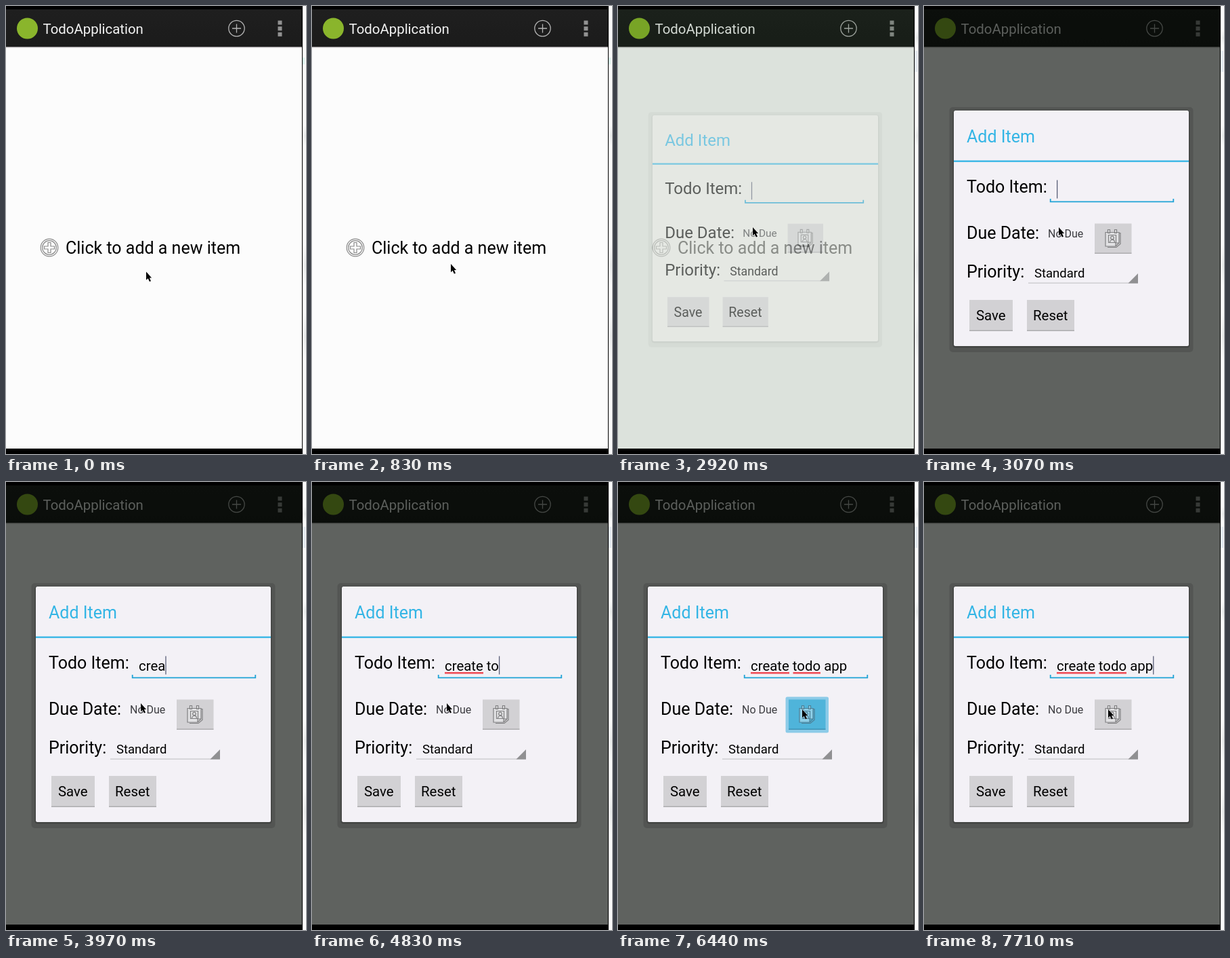
Recreate the animation shown at these times as an HTML page. Size 443 px wide and 660 px high, loop 8000 ms.

```html
<!DOCTYPE html>
<html lang="en">
<head>
<meta charset="utf-8">
<title>Todo list</title>
<style>
  html, body { margin: 0; width: 100%; height: 100%; overflow: hidden; background: #fff; }
  svg { display: block; width: 443px; height: 660px; }
  text { font-family: Roboto, "Open Sans", sans-serif; white-space: pre; }
  .label { font-size: 25px; }
  .small { font-size: 20.4px; }
  .line { fill: none; stroke: #8a8a8a; stroke-width: 1.2; }
</style>
</head>
<body>
<svg viewBox="0 0 443 660">
  <defs>
    <linearGradient id="bar" x2="0" y2="1">
      <stop stop-color="#1f1f1f"/><stop offset="1" stop-color="#1b1b1b"/>
    </linearGradient>
    <linearGradient id="drop" x2="0" y2="1">
      <stop stop-color="#8c868a"/><stop offset="1" stop-color="#fcfcfc"/>
    </linearGradient>
    <linearGradient id="smudge" x2="0" y2="1">
      <stop stop-color="#eceeee" stop-opacity="0"/><stop offset=".5" stop-color="#eceeee"/>
      <stop offset="1" stop-color="#eceeee" stop-opacity="0"/>
    </linearGradient>
  </defs>

  <!-- window behind, right edge -->
  <rect x="437" width="6" height="660" fill="#fdfdfd"/>
  <rect x="438" y="176" width="5" height="30" fill="url(#smudge)"/>
  <rect x="438" y="352" width="5" height="60" fill="url(#smudge)"/>
  <rect x="438" y="452" width="5" height="68" fill="url(#smudge)"/>
  <rect id="edgeA" x="438" y="76" width="3" height="10" fill="#d9f3ea"/>
  <g id="edgeB">
    <rect x="438" y="36" width="5" height="22" fill="url(#smudge)"/>
    <rect x="438" y="66" width="4" height="31" fill="#e3e9f1"/>
  </g>

  <!-- app screen -->
  <rect width="438" height="660"/>
  <rect y="60" width="437" height="592" fill="#fcfcfc"/>
  <rect y="5" width="437" height="55" fill="url(#bar)"/>
  <rect y="60" width="437" height="2" fill="url(#drop)"/>
  <circle cx="31.5" cy="33" r="15.5" fill="#8ab52c"/>
  <text class="small" x="54.5" y="41" fill="#f3f3f3">TodoApplication</text>
  <path d="M328.8 33a11.7 11.7 0 1 0 23.4 0a11.7 11.7 0 1 0-23.4 0M334 33h13M340.5 26.5v13"
        fill="none" stroke="#b4b4b4" stroke-width="1.3"/>
  <path d="M401.5 21.5h6v6h-6zM401.5 30.2h6v6h-6zM401.5 38.8h6v6h-6z" fill="#929292"/>
  <circle class="line" cx="64" cy="356" r="12.8"/>
  <circle class="line" cx="64" cy="356" r="10.3"/>
  <path class="line" d="M62 348.5h4v5.5h5.5v4h-5.5v5.5h-4v-5.5h-5.5v-4h5.5z"/>
  <text class="label" x="88" y="365">Click to add a new item</text>
  <rect id="dim" y="5" width="437" height="647"/>

  <g id="dialog">
    <g id="shade">
      <rect x="37.5" y="149" width="360" height="361" rx="5" opacity=".13"/>
      <rect x="42.5" y="153.5" width="350" height="350" rx="4" opacity=".2"/>
    </g>
    <rect id="card" x="44" y="154" width="347" height="347" rx="2.5"/>
    <text class="label" x="63" y="201" fill="#33b5e5">Add Item</text>
    <rect x="44" y="227.5" width="347" height="2.3" fill="#33b5e5"/>
    <text class="label" x="63" y="275">Todo Item:</text>
    <path d="M186.7 284v4.3h181.6v-4.3" fill="none" stroke="#1fa3d6" stroke-width="1.8"/>
    <g fill="#f0505a">
      <rect id="wave1" x="196" y="280" width="57" height="2.6"/>
      <rect id="wave2" x="258.5" y="280" width="40.5" height="2.6"/>
    </g>
    <text id="typed" class="small" x="196" y="278"></text>
    <rect id="caret" y="256.5" width="1.3" height="27" fill="#5a5f78"/>

    <text class="label" x="63" y="343">Due Date:</text>
    <text x="183" y="341" font-size="16" fill="#3c3c40">No Due</text>
    <rect id="glow" x="247.5" y="316.5" width="63.5" height="53" rx="2.5" fill="#8ccbe8"/>
    <rect id="pick" x="252" y="320.5" width="54.5" height="44"/>
    <rect id="pickEdge" x="252" y="363.5" width="54.5" height="1.5"/>
    <g id="icon" fill="none" stroke-width="1.2">
      <path d="M288 334.5h2v16l-6 5h-13" />
      <path d="M268 333.5h20v15.5l-5 5h-15zM288 349h-5v5" fill="#fff" fill-opacity=".35"/>
      <path d="M272.5 337.500h11v11h-11zM274.500 348.500q0-3.500 3.500-4t3.500 4"/>
      <circle cx="278" cy="341.500" r="2.300"/>
      <path d="M271.500 329.500h3v5h-3zM281.500 329.500h3v5h-3z" fill="#fff" fill-opacity=".35"/>
    </g>

    <text class="label" x="63" y="400">Priority:</text>
    <text x="163" y="400" font-size="18.5">Standard</text>
    <rect x="154" y="407.5" width="162" height="1.2" fill="#c6c5c9"/>
    <path d="M316 394v14.5h-14.5z" fill="#909092"/>

    <g fill="#d2d1d4">
      <rect x="67" y="433" width="64" height="46"/>
      <rect x="152" y="433" width="70" height="46"/>
    </g>
    <path d="M67 478.3h64M152 478.3h70" stroke="#aeadb0" stroke-width="1.4"/>
    <text class="small" x="77" y="463">Save</text>
    <text class="small" x="161" y="463">Reset</text>
  </g>

  <path id="pointer" d="M0 0v12.2l2.7-2.4 2.2 4.8 2.1-.9-2.1-4.8h3.2z"
        stroke="#fff" stroke-width=".6" paint-order="stroke"/>
</svg>
<script>
  const LOOP = 8000;
  const $ = id => document.getElementById(id);
  const set = (id, attrs) => {
    for (const k in attrs) $(id).setAttribute(k, attrs[k]);
  };
  const show = (id, on) => set(id, { visibility: on ? "inherit" : "hidden" });

  // value of the last [time, value] entry already reached
  const at = (steps, t) => steps.reduce((v, s) => t >= s[0] ? s[1] : v, steps[0][1]);

  const pointer = [
    [0, [207, 391.5]], [830, [205, 380]], [950, [200, 354]], [1070, [197, 336]],
    [1220, [199, 326]], [5890, [226, 330]], [6010, [260, 340]], [6160, [272, 335]]
  ];
  const phrase = "create todo app";
  const letters = [
    [0, 0], [3460, 1], [3580, 2], [3850, 3], [3970, 4], [4090, 5], [4370, 6],
    [4520, 7], [4670, 8], [4830, 9], [4980, 10], [5130, 11], [5280, 13],
    [5430, 14], [5590, 15]
  ];
  const opening = {
    dim: { fill: "#003400", opacity: .13 },
    dialog: {
      opacity: .58,
      transform: "translate(217.5 327.5) scale(.96) translate(-217.5 -327.5)"
    },
    shade: { opacity: .4 },
    card: { fill: "#ecede9" }
  };
  const open = {
    dim: { fill: "#000500", opacity: .62 },
    dialog: { opacity: 1, transform: "" },
    shade: { opacity: 1 },
    card: { fill: "#f3f1f6" }
  };

  function draw(t) {
    const [x, y] = at(pointer, t);
    set("pointer", { transform: `translate(${x} ${y})` });

    show("edgeA", t < 1520);
    show("edgeB", t >= 1520);

    const look = t >= 3070 ? open : opening;
    for (const id in look) set(id, look[id]);
    show("dim", t >= 2920);
    $("dialog").style.display = t >= 2920 ? "" : "none";

    const n = at(letters, t);
    $("typed").textContent = phrase.slice(0, n);
    set("caret", { x: 196 + (n ? $("typed").getComputedTextLength() : 0) });
    show("caret", t < 6160 || t >= 7710);
    show("wave1", t >= 4830);
    show("wave2", t >= 5280);

    const pressed = t >= 6440 && t < 7120;
    show("glow", pressed);
    set("pick", { fill: pressed ? "#4fb4da" : "#d2d1d4" });
    set("pickEdge", { fill: pressed ? "#3f93b5" : "#aeadb0" });
    set("icon", { stroke: pressed ? "#4d7f95" : "#808082" });
  }

  function frame() {
    draw(performance.now() % LOOP);
    requestAnimationFrame(frame);
  }
  frame();
</script>
</body>
</html>
```
